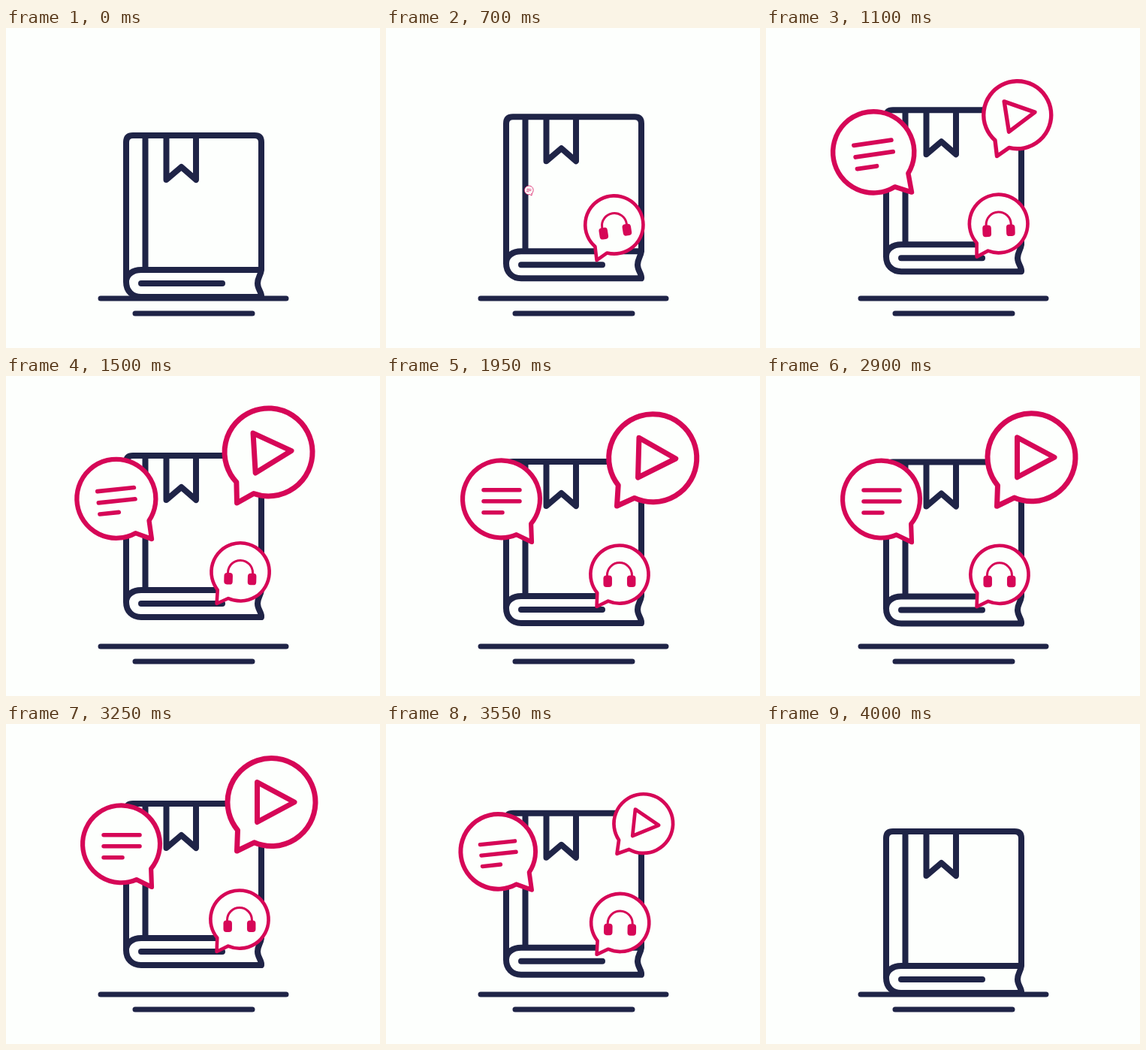
An HTML page for the animation above (4.15 s loop, 498x426 px).

```html
<!DOCTYPE html>
<html lang="en">
<head>
<meta charset="utf-8">
<title>Book with speech bubbles</title>
<style>
  html, body { margin: 0; width: 100%; height: 100%; overflow: hidden; background: #fdfffd; }
  svg { display: block; width: 498px; height: 426px; }
  .ink { fill: none; stroke: #1f2447; stroke-width: 8; stroke-linecap: round; stroke-linejoin: round; }
  .ground { stroke-width: 7; }
  .pink { fill: none; stroke: #d60757; stroke-width: 7; stroke-linecap: round; stroke-linejoin: round; }
  .shell { fill: #fdfffd; }
</style>
</head>
<body>
<svg viewBox="0 0 498 426">
  <path class="ink ground" d="M126 360H373M172 380H328"/>
  <g id="book" class="ink">
    <path d="M160 338V152Q160 143 169 143H331Q340 143 340 152V322C339 330 335 332 335 340C335 348 341 352 340 358H180C168 358 160 350 160 338C160 328 169 322 180 322H340" fill="#fdfffd"/>
    <path d="M185.5 144V321M180 340H288"/>
    <path d="M213.5 144V202L233.5 185L253 202V144" stroke-linejoin="round"/>
  </g>
  <g id="bubbles"></g>
</svg>
<script>
const STEP = 50, LAST = 4000, LOOP = 4150;

// Shared outline: tail tip at the origin, circle centre at (46, -65).
const SHELL = 'M1 -27.6L0 0L23 -11.2A58.5 58.5 0 1 0 1 -27.6Z';

const bubbles = [
  { x: 280.6, y: 321.5, dir: 1, size: 0.66, enter: 440, leave: 3520,
    icon: `<path class="pink" stroke-linecap="butt" style="stroke-width:3" d="M-16.5 5V1A16.5 16.5 0 0 1 16.5 1V5"/>
      <g fill="#d60757"><rect x="-21.5" y="1.5" width="11.5" height="15.5" rx="4"/>
      <rect x="10" y="1.5" width="11.5" height="15.5" rx="4"/></g>` },
  { x: 194, y: 235.5, dir: -1, size: 0.88, enter: 670, leave: 3430,
    icon: '<path class="pink" style="stroke-width:5.5" d="M-23.5 -12H24.5M-23.5 3H24.5M-23.5 18H1.5"/>' },
  { x: 307.5, y: 187.5, dir: 1, size: 1, enter: 900, leave: 3340,
    icon: '<path class="pink" d="M-19 -26.5L30.5 0L-19 26.5Z"/>' }
];

// Key times in ms with values.
const bookFall = [[1500, -37], [2500, -18], [3250, -37], [4000, 0]];
const bubbleFall = [[1500, -37], [2500, -18], [3250, -37], [4250, 0]];
const enterScale = [[0, 0], [260, 1], [400, 1.06], [600, 1], [830, 1.02], [1060, 1]];
const enterTilt = [[0, -8], [260, -9], [400, 9], [600, -3.4], [830, 6], [1060, 1.5], [1300, 0]];
const leaveScale = [[0, 1], [110, 1], [205, 0.7], [330, 0]];
const leaveTilt = [[0, 0], [110, 6], [205, 6], [330, 0]];

const linear = p => p;
const smooth = p => (1 - Math.cos(Math.PI * p)) / 2;

function along(keys, t, ease) {
  if (t <= keys[0][0]) return keys[0][1];
  for (let i = 1; i < keys.length; i++) {
    const [t0, v0] = keys[i - 1], [t1, v1] = keys[i];
    if (t <= t1) return v0 + (v1 - v0) * ease((t - t0) / (t1 - t0));
  }
  return keys[keys.length - 1][1];
}

function lift(keys, t) {
  return t < 1500 ? -37 * Math.sin(Math.PI / 2 * t / 1500) : along(keys, t, smooth);
}

const book = document.getElementById('book');
const layer = document.getElementById('bubbles');
layer.innerHTML = bubbles.map(({ dir, size, icon }) => `<g>
  <path class="pink shell" d="${SHELL}" transform="scale(${dir * size} ${size})"/>
  <g transform="translate(${dir * 46 * size} ${-65 * size})">${icon}</g></g>`).join('');

function draw(t) {
  book.setAttribute('transform', `translate(0 ${lift(bookFall, t)})`);
  const float = lift(bubbleFall, t) / 2;
  bubbles.forEach((b, i) => {
    const age = t - b.enter, gone = t - b.leave;
    const scale = along(enterScale, age, linear) * along(leaveScale, gone, linear);
    const tilt = b.dir * (along(enterTilt, age, smooth) + along(leaveTilt, gone, smooth));
    const node = layer.children[i];
    node.setAttribute('visibility', scale > 0 ? 'visible' : 'hidden');
    node.setAttribute('transform',
      `translate(${b.x} ${b.y + float}) rotate(${tilt}) scale(${scale})`);
  });
}

const start = performance.now();
function tick() {
  const t = (performance.now() - start) % LOOP;
  draw(Math.min(LAST, Math.floor(t / STEP) * STEP));
  requestAnimationFrame(tick);
}
tick();
</script>
</body>
</html>
```
